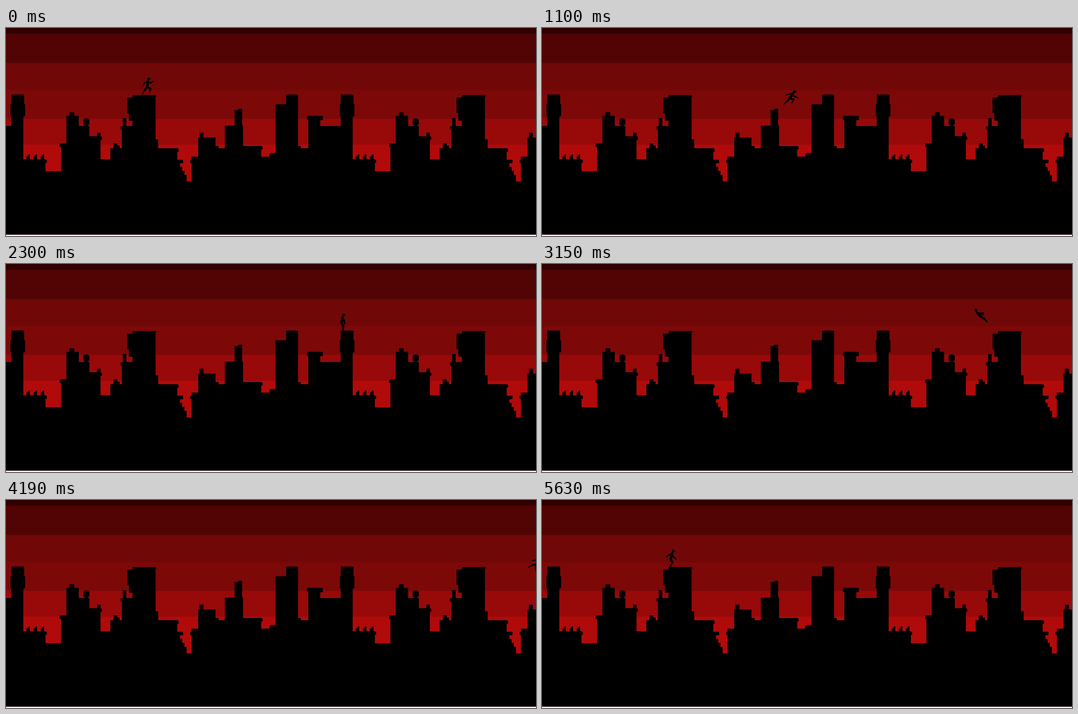
Recreate the animation shown at these times as an HTML page with a canvas. Size 1194 by 469 pixels, loop 5.79 s.

```html
<!DOCTYPE html>
<html lang="en">
<head>
<meta charset="utf-8">
<title>Rooftop runner</title>
<style>
  html, body { margin: 0; width: 1194px; height: 469px; overflow: hidden; background: #000; }
  canvas { display: block; }
</style>
</head>
<body>
<canvas id="stage" width="1194" height="469"></canvas>
<script>
const ctx = document.getElementById('stage').getContext('2d');
const W = 1194, LOOP = 5790, PERIOD = 742, GROUND = 465;
const mix = (a, b, u) => a + (b - a) * u;

const sky = [[0, '#300000'], [13, '#520404'], [79, '#700808'], [140, '#7d0808'], [205, '#980909'], [263, '#b00a0a']];

// left, right, roof height, sides with an eave
const buildings = [
  [0, 386, 323], [386, 418, 346], [418, 742, 290],
  [0, 12, 221], [12, 39, 150], [39, 89, 296, 'r'],
  [124, 213, 260, 'l'], [136, 164, 198], [143, 154, 190], [164, 188, 221], [188, 213, 244, 'r'], [205, 213, 236],
  [213, 261, 296], [235, 261, 271], [242, 251, 260], [242, 256, 265],
  [261, 337, 221, 'l'], [263, 271, 203], [285, 337, 151], [337, 343, 251], [337, 386, 271, 'r'],
  [418, 434, 296, 'l'], [433, 472, 247], [436, 445, 236], [472, 479, 266], [472, 493, 271],
  [493, 534, 220], [515, 532, 185], [523, 532, 182], [534, 575, 266, 'r'],
  [596, 607, 282, 'l'], [607, 658, 172], [631, 658, 150], [658, 664, 266], [658, 681, 271],
  [681, 708, 198], [681, 742, 221]
];

function drawSky() {
  for (const [y, color] of sky) {
    ctx.fillStyle = color;
    ctx.fillRect(0, y, W, 469 - y);
  }
}

function drawCity(left) {
  const box = (x, y, w, h) => ctx.fillRect(x, y, w, h);
  ctx.save();
  ctx.translate(left, 0);
  ctx.fillStyle = '#000';
  for (const [l, r, top, eave = ''] of buildings) {
    box(l, top, r - l, GROUND - top);
    if (eave === 'l') box(l - 3, top + 1, 5, 7);
    if (eave === 'r') box(r - 2, top + 1, 5, 7);
  }
  // water tower, tank, hanging slab, flat cap
  box(12, 150, 29, 50);
  box(10, 172, 33, 27);
  box(174, 206, 14, 12);
  box(177, 204, 8, 18);
  box(273, 157, 12, 35);
  box(277, 190, 8, 19);
  box(337, 152, 2, 3);
  box(678, 199, 36, 8);
  box(680, 198, 33, 10);
  // crumbling wall
  box(386, 297, 13, 8);
  for (let i = 0; i < 4; i++) box(386, 304 + 9 * i, 6 + 5 * i, 42 - 9 * i);
  // saw-tooth roof
  for (let x = 46; x < 80; x += 16) {
    ctx.beginPath();
    ctx.moveTo(x, 298);
    ctx.lineTo(x, 291);
    ctx.lineTo(x + 6, 285);
    ctx.lineTo(x + 8, 285);
    ctx.lineTo(x + 8, 298);
    ctx.fill();
  }
  ctx.restore();
}

// Degrees: torso from upright; limbs from hanging, forward positive
// torso, upper and lower arm (back, front), thigh and shin (back, front)
const poses = {
  run:  [7, -75, -33, 67, 122, -36, -33, 61, -18],
  pass: [15, -75, -50, 20, 40, 30, -30, 24, -34],
  leap: [34, -85, -78, 30, 75, -49, -48, 78, -28],
  soar: [35, -95, -85, 95, 110, -85, -60, -10, 10],
  drop: [22, 25, 85, 20, 75, 30, 5, 26, 3],
  land: [10, 35, 10, 25, 15, 30, -10, 25, -12],
  lean: [-42, 75, 95, 60, 80, 62, 47, 55, 45]
};
const blend = (a, b, u) => poses[a].map((v, i) => mix(v, poses[b][i], u));

// Pose order within a jump, by share of the air time
const jumpPoses = [[0, 'pass'], [0.12, 'leap'], [0.35, 'soar'], [0.8, 'soar'], [0.87, 'drop'], [1, 'land']];
const flipPoses = [[0, 'pass'], [0.12, 'leap'], [0.35, 'lean'], [0.8, 'lean'], [1, 'land']];

// Jumps between roofs: time, x and roof height at either end, extra rise
const jumps = [
  { from: [160, 346, 150], to: [940, 524, 183], rise: 46 },
  { from: [1060, 549, 183], to: [1420, 634, 150], rise: 10 },
  { from: [1640, 655, 150], to: [2300, 756, 150], rise: 22 },
  { from: [2540, 784, 150], to: [3300, 1038, 152], rise: 26, flip: true },
  { from: [3620, 1083, 152], to: [4330, 1222, 200], rise: 45 },
  { from: [4330, -24, 160], to: [4450, 15, 150], rise: 4 },
  { from: [4560, 40, 150], to: [4960, 138, 192], rise: 27 },
  { from: [5060, 160, 198], to: [5590, 283, 150], rise: 16 }
];
const HIP = 17, STRIDE = 400;

function airborne(jump, u) {
  const [, x0, y0] = jump.from, [, x1, y1] = jump.to;
  const order = jump.flip ? flipPoses : jumpPoses;
  const i = order.findIndex(p => p[0] > u);
  const [a, b] = [order[i - 1], order[i]];
  return {
    x: mix(x0, x1, u),
    y: mix(y0, y1, u) - HIP - 4 * jump.rise * u * (1 - u),
    turn: jump.flip ? 360 * Math.max(0, Math.min(1, (u - 0.1) / 0.65)) : 0,
    pose: blend(a[1], b[1], (u - a[0]) / (b[0] - a[0]))
  };
}

function running(last, next, t) {
  const [t0, x0, y0] = last.to;
  const [t1, x1, y1] = next.from;
  const end = t1 < t0 ? t1 + LOOP : t1;
  const u = (t - t0) / (end - t0);
  const age = t - t0;
  const swing = (1 - Math.cos(age / STRIDE * 2 * Math.PI)) / 2;
  return {
    x: mix(x0, x1, u),
    y: mix(y0, y1, u) - HIP,
    turn: 0,
    pose: age < 40 ? blend('land', 'pass', age / 40) : blend('pass', 'run', swing)
  };
}

function runnerAt(t) {
  if (t < jumps[0].from[0]) t += LOOP;
  const i = jumps.findLastIndex(j => j.from[0] <= t);
  const jump = jumps[i];
  const u = (t - jump.from[0]) / (jump.to[0] - jump.from[0]);
  return u < 1 ? airborne(jump, u) : running(jump, jumps[(i + 1) % jumps.length], t);
}

// Stepped playback: start of each stretch and its step length
const tempo = [[0, 80], [640, 50], [940, 80], [2700, 50], [3150, 80]];

function stepTime(t) {
  const [from, step] = tempo.findLast(s => s[0] <= t);
  return Math.min(from + Math.floor((t - from) / step) * step, 5630);
}

function drawRunner({ x, y, turn, pose }) {
  const [torso, armA, foreA, armB, foreB, thighA, shinA, thighB, shinB] = pose.map(a => a * Math.PI / 180);
  const reach = ([px, py], angle, len) => [px + Math.sin(angle) * len, py + Math.cos(angle) * len];
  const line = (width, ...points) => {
    ctx.lineWidth = width;
    ctx.beginPath();
    points.forEach(p => ctx.lineTo(...p));
    ctx.stroke();
  };
  const limb = (root, upper, lower, len1, len2, width) => {
    const joint = reach(root, upper, len1);
    line(width, root, joint);
    line(2.6, joint, reach(joint, lower, len2));
  };
  const hip = [0, 0];
  const neck = reach(hip, Math.PI - torso, 12);
  const head = reach(neck, Math.PI - torso - 0.2, 6);

  ctx.save();
  ctx.translate(x, y);
  ctx.rotate(turn * Math.PI / 180);
  ctx.strokeStyle = ctx.fillStyle = '#000';
  ctx.lineCap = ctx.lineJoin = 'round';
  line(6, hip, neck);
  line(3, neck, head);
  limb(neck, armA, foreA, 7, 8, 2.8);
  limb(neck, armB, foreB, 7, 8, 2.8);
  limb(hip, thighA, shinA, 9, 10, 4.4);
  limb(hip, thighB, shinB, 9, 10, 4.4);
  ctx.beginPath();
  ctx.arc(...head, 2.8, 0, Math.PI * 2);
  ctx.fill();
  ctx.fillRect(head[0] - 2, head[1] - 4, 2, 2);
  ctx.fillRect(head[0] + 1, head[1] - 2, 4, 1.5);
  ctx.restore();
}

function drawBase() {
  ['#40282a', '#a09092', '#fff', '#fff'].forEach((color, i) => {
    ctx.fillStyle = color;
    ctx.fillRect(0, GROUND + i, W, 1);
  });
}

const start = performance.now();

function frame() {
  const t = (performance.now() - start) % LOOP;
  drawSky();
  drawCity(0);
  drawCity(PERIOD);
  drawRunner(runnerAt(stepTime(t)));
  drawBase();
  requestAnimationFrame(frame);
}
frame();
</script>
</body>
</html>
```
